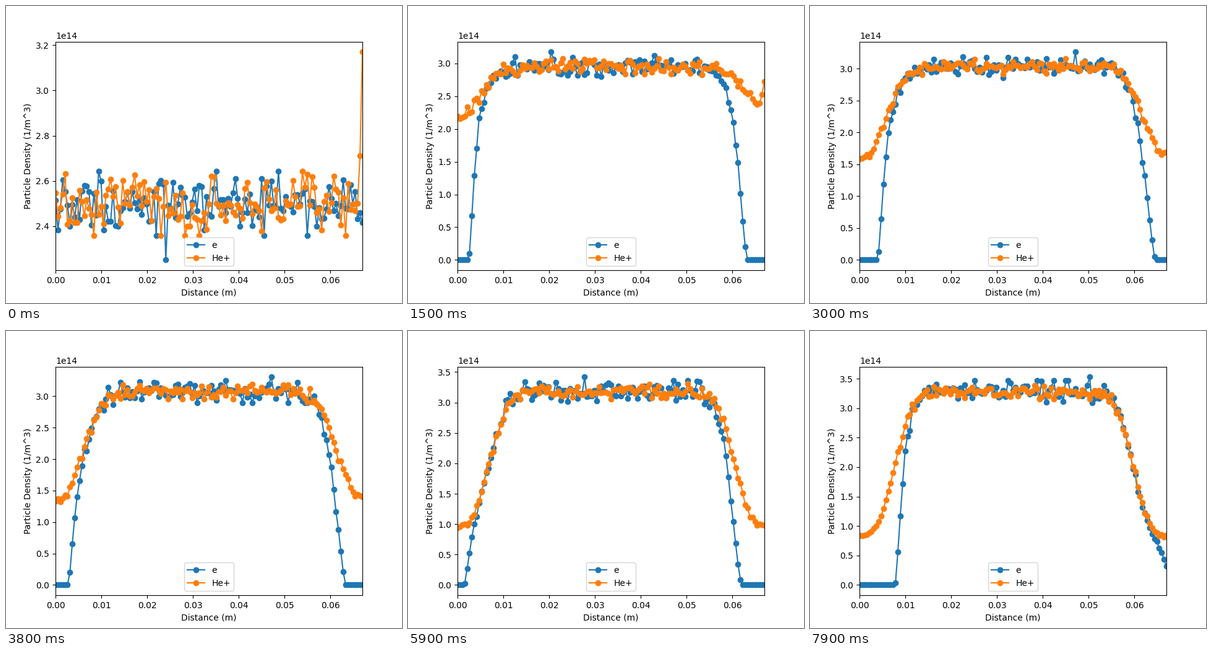
A matplotlib script for the animation above (8 s loop, 640 by 480 pixels).

```python
import matplotlib.pyplot as plt
import numpy as np
from matplotlib.animation import FuncAnimation

FRAMES, STEP = 80, 100
GAP = 67.0                        # electrode gap in mm
x = np.linspace(0, GAP, 129)
depths = x, GAP - x               # distance from the left and right wall


def stretched(depth, length, power):
    """Falls from 1 at depth 0 towards 0."""
    return np.exp(-(np.clip(depth, 0, None) / length) ** power)


def noise(rng, size):
    return size * np.clip(rng.normal(size=x.size), -2.1, 2.1)


def bulk(n):
    """Density of the flat middle: a quick rise, then a slow climb."""
    return 2.5 + 0.38 * (1 - np.exp(-n / 3)) + 0.0051 * n


def ion_profile(n):
    top = bulk(n)
    drained = stretched(n, 32, 1.5)
    power, length = 1.8 + 0.0155 * n, 6.2 + 0.033 * n
    profile = np.full_like(x, top)
    for depth, excess, scale in zip(depths, (1.95, 2.2), (1, 0.95)):
        wall = min(top, 0.8 + excess * drained)
        profile -= (top - wall) * stretched(depth, scale * length, power)
    return profile


def wall_spike(n):
    """Ion pile-up at the right wall: grows, then collapses."""
    return (0.67 + 0.008 * n ** 2) / (1 + np.exp((n - 13.5) / 0.8))


def sheath(n):
    """Share of electrons left beside the two oscillating sheaths."""
    mean = 3.2 * (1 - np.exp(-n / 4))
    swing = 4 * np.sin(np.radians(24.2 * n))
    swing += 0.9 * np.cos(2 * np.pi * (n - 38) / 43)
    share = 1
    for depth, edge, length in zip(depths, (mean + swing, mean - swing),
                                   (1.5, 2.4)):
        share = share * (1 - stretched(depth - edge, length, 1.4))
    return share


def densities(n):
    rng = np.random.default_rng(500 + n)
    profile = ion_profile(n)

    ion_noise = noise(rng, 0.019 if n else 0.027)
    ion_noise[-1] = 0
    ions = profile * (1 + ion_noise)
    ions[-2:] += wall_spike(n) * np.array([0.33, 1])

    # One electron sample stands out: a dip at the start, later a peak
    electron_noise = noise(rng, 0.027)
    electron_noise[rng.integers(30, 98)] = 0.075 if n else -0.1
    electrons = profile * (1 + electron_noise)
    if n:
        electrons *= sheath(n)
    return electrons * 1e14, ions * 1e14


fig, ax = plt.subplots(figsize=(6.4, 4.8), dpi=100)
lines = [ax.plot(x / 1000, np.zeros_like(x), "o-", label=name)[0]
         for name in ("e", "He+")]
ax.set_xlim(0, GAP / 1000)
ax.set_xlabel("Distance (m)")
ax.set_ylabel("Particle Density (1/m^3)")
ax.legend(loc="lower center")


def draw(n):
    data = densities(n)
    for line, values in zip(lines, data):
        line.set_ydata(values)
    low, high = np.min(data), np.max(data)
    pad = 0.05 * (high - low)
    ax.set_ylim(low - pad, high + pad)
    return lines


anim = FuncAnimation(fig, draw, frames=FRAMES, interval=STEP,
                     repeat=True, repeat_delay=0, blit=False)
plt.show()
```
